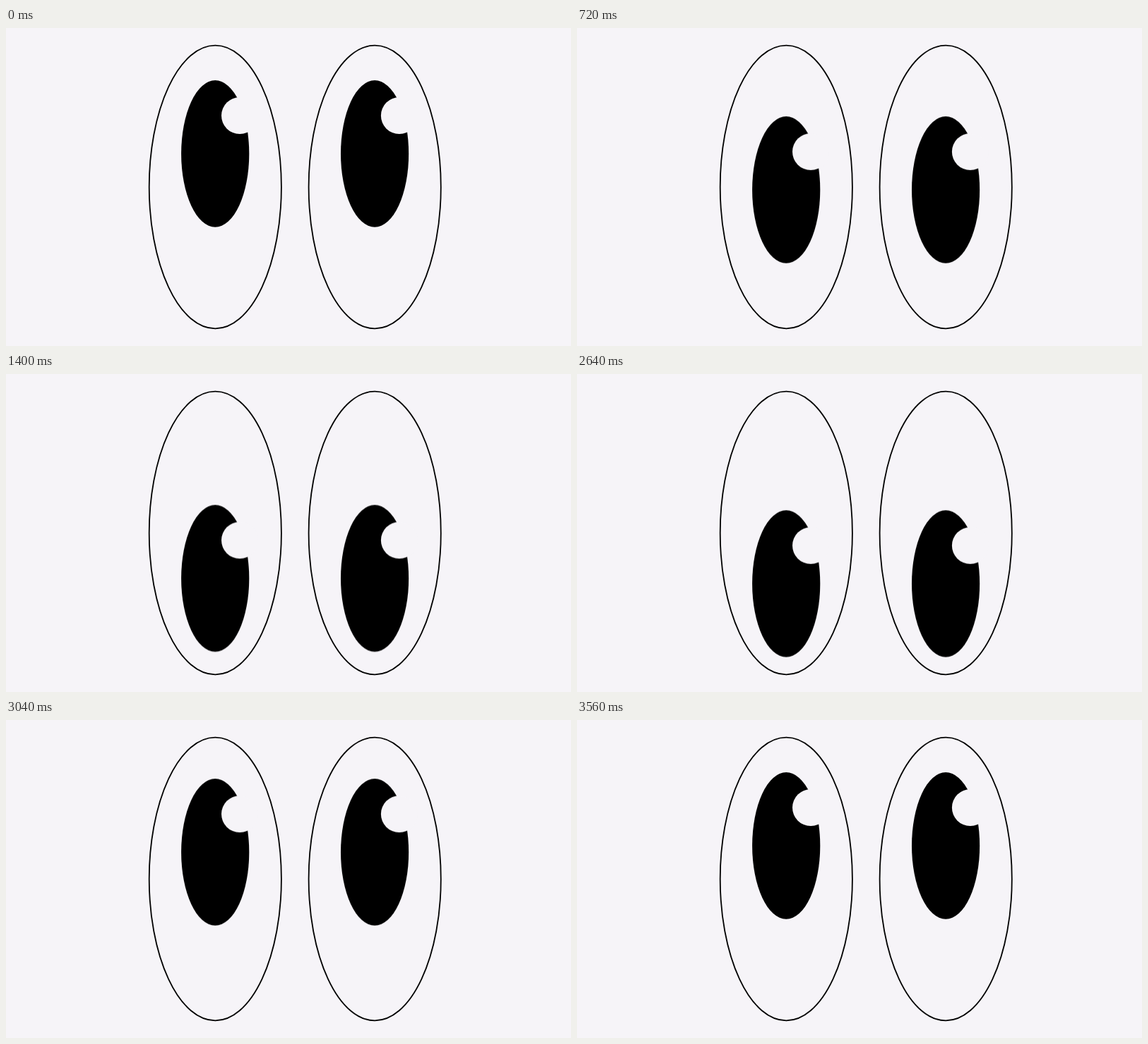
Recreate the animation shown at these times as an HTML page. Size 800 px wide and 450 px high, loop 4320 ms.

```html
<!DOCTYPE html>
<html lang="en">
<head>
<meta charset="utf-8">
<title>Looking eyes</title>
<style>
  html, body { margin: 0; width: 100%; height: 100%; overflow: hidden; background: #f6f4f8; }
  svg { display: block; width: 100vw; height: 100vh; }
  .rim { fill: none; stroke: #000; stroke-width: 1.8; }
  .glint { fill: #f6f4f8; }
</style>
</head>
<body>
<svg viewBox="0 0 800 450">
  <defs>
    <g id="pupil">
      <ellipse cx="296.2" cy="177.9" rx="48.1" ry="103.8"/>
      <circle class="glint" cx="331" cy="124" r="26"/>
    </g>
  </defs>
  <ellipse class="rim" cx="296.3" cy="225" rx="93.6" ry="200.3"/>
  <ellipse class="rim" cx="522.2" cy="225" rx="93.6" ry="200.3"/>
  <g id="gaze">
    <use href="#pupil"/>
    <use href="#pupil" x="225.9"/>
  </g>
</svg>
<script>
  const LOOP = 4320, TICK = 40, DROP = 111.3;

  // Each glance winds up, swings across and overshoots before it settles.
  const glances = [
    { start: 0, end: 1400, from: 0, to: DROP, curve: [0.63, -1, 0.43, 2] },
    { start: 2632, end: 3560, from: DROP, to: 0, curve: [0.113, -1, 0.316, 2] }
  ];

  const cubic = (s, a, b) =>
    3 * s * (1 - s) ** 2 * a + 3 * s * s * (1 - s) * b + s ** 3;

  function ease(x, [x1, y1, x2, y2]) {
    if (x <= 0) return 0;
    if (x >= 1) return 1;
    let lo = 0, hi = 1;
    for (let i = 0; i < 40; i++) {
      const mid = (lo + hi) / 2;
      if (cubic(mid, x1, x2) < x) lo = mid; else hi = mid;
    }
    return cubic(lo, y1, y2);
  }

  function offset(t) {
    let y = 0;
    for (const g of glances) {
      if (t < g.start) break;
      const p = ease((t - g.start) / (g.end - g.start), g.curve);
      y = g.from + (g.to - g.from) * p;
    }
    return y;
  }

  const steps = [];
  for (let t = 0; t <= LOOP; t += TICK) {
    steps.push({
      offset: t / LOOP,
      transform: `translateY(${offset(t).toFixed(2)}px)`,
      easing: "steps(1, end)"
    });
  }
  document.getElementById("gaze").animate(steps, { duration: LOOP, iterations: Infinity });
</script>
</body>
</html>
```
